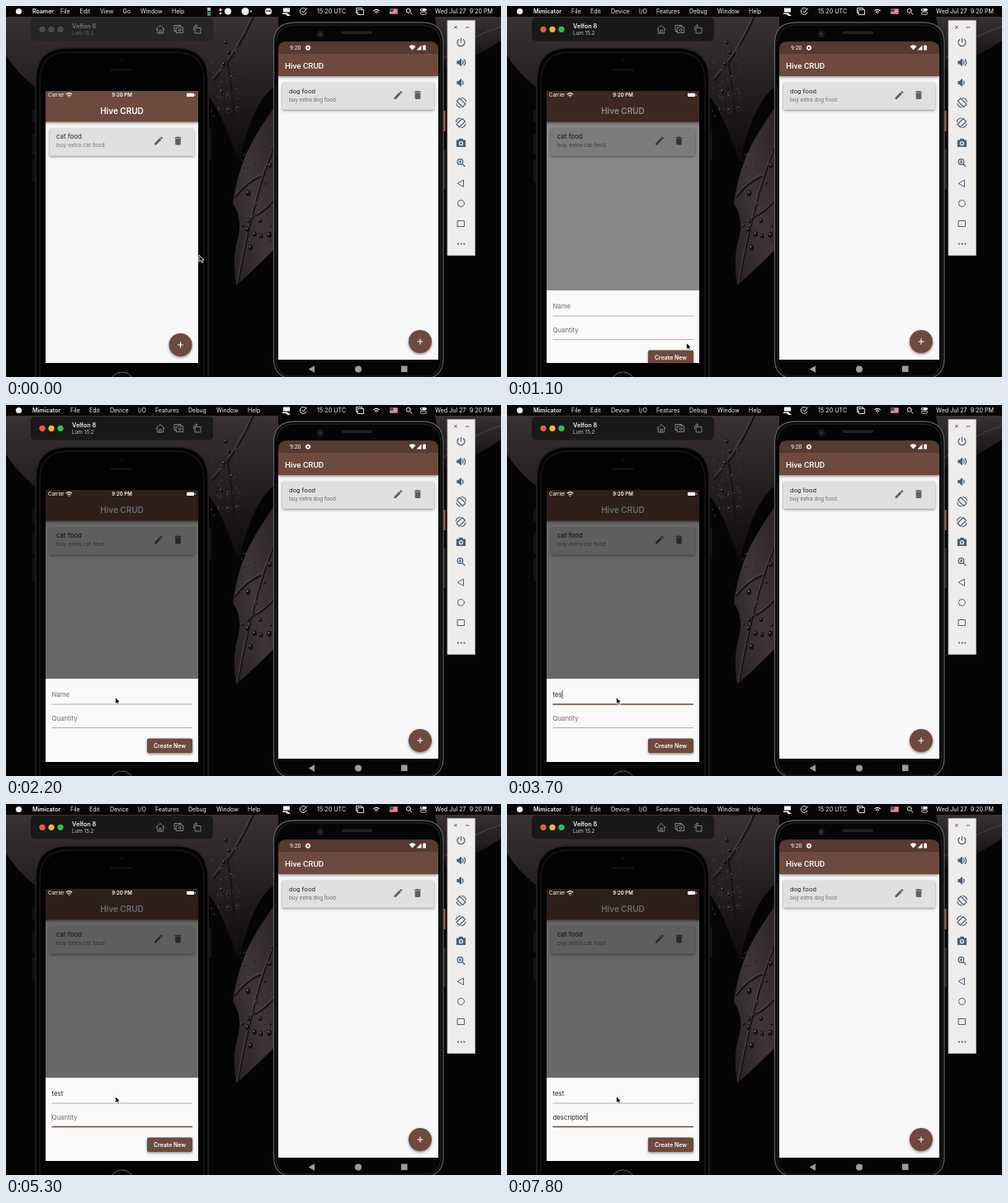
An HTML page that plays this animation: 600x450 px, repeating every 8 s.

```html
<!DOCTYPE html>
<html lang="en">
<head>
<meta charset="utf-8">
<title>Hive CRUD</title>
<style>
html, body { margin: 0; width: 100%; height: 100%; overflow: hidden; background: #060506; }
svg { display: block; width: 600px; height: 450px; font-family: Inter, sans-serif; }
text { white-space: pre; }
.roboto { font-family: Roboto, sans-serif; }
.bar { font-size: 7px; fill: #f2f2f2; }
.b { font-weight: 600; }
.mid { text-anchor: middle; }
.line { fill: none; stroke-linecap: round; stroke-linejoin: round; }
.field { font-size: 7.8px; }
</style>
</head>
<body>
<svg viewBox="0 0 600 450">
<defs>
  <path id="pencil" transform="scale(.55) translate(-12 -12)" d="M3 17.25V21h3.75L17.81 9.94l-3.75-3.75zM20.71 7.04c.39-.39.39-1.02 0-1.41l-2.34-2.34c-.39-.39-1.02-.39-1.41 0l-1.83 1.83 3.75 3.75z"/>
  <path id="bin" transform="scale(.55) translate(-12 -12)" d="M6 19c0 1.1.9 2 2 2h8c1.1 0 2-.9 2-2V7H6zM19 4h-3.5l-1-1h-5l-1 1H5v2h14z"/>
  <path id="wifi" d="M-4-1.6A5.6 5.6 0 0 1 4-1.6L0 3Z"/>
  <g id="waves" class="line" stroke="#fff" stroke-width="1.1"><path d="M-3.2-.8A4.5 4.5 0 0 1 3.2-.8M-1.6 1A2.3 2.3 0 0 1 1.6 1M0 2.6V2.6"/></g>
  <g id="fab">
    <circle r="14" fill="#6e483d" filter="url(#lift)"/>
    <path d="M-3.4 0H3.4M0-3.4V3.4" stroke="#fff" stroke-width="1.1"/>
  </g>
  <filter id="lift" x="-30%" y="-30%" width="160%" height="170%"><feDropShadow dx="0" dy="1.4" stdDeviation="1.5" flood-opacity=".45"/></filter>
  <linearGradient id="leaf" x1="1" y1="0" x2="0" y2="1">
    <stop offset="0" stop-color="#292223"/><stop offset=".55" stop-color="#3e3537"/><stop offset="1" stop-color="#251e1f"/>
  </linearGradient>
  <linearGradient id="fade" x1="0" y1="0" x2="0" y2="1">
    <stop offset="0" stop-color="#393234"/><stop offset="1" stop-color="#0d0a0b"/>
  </linearGradient>
  <clipPath id="screen"><path d="M48 103H233V433H48Z"/></clipPath>
</defs>

<!-- wallpaper -->
<path fill="#060506" d="M0 0H600V450H0Z"/>
<path fill="url(#fade)" d="M0 12H330V95Q300 110 282 190Q262 130 246 110L35 98Q14 82 0 60Z"/>
<path fill="url(#fade)" d="M520 12H600V42Q570 62 530 78Z"/>
<path fill="url(#leaf)" d="M332 112C308 150 284 175 275 240Q288 258 280 286Q274 308 279 339Q305 316 332 288Z"/>
<path class="line" stroke="#171213" stroke-width="2" d="M331 160Q306 205 281 337M309 207Q292 214 278 232M296 258Q316 250 331 228M300 13Q278 62 252 90M268 66Q275 100 279 174"/>
<path class="line" stroke="#5e5456" stroke-width=".7" d="M331 157Q304 204 280 336M309 204Q292 211 277 230M297 256Q316 247 331 225M298 13Q276 60 250 88M600 25Q565 35 530 64"/>
<g id="drops"></g>

<!-- menu bar -->
<path fill="#080607" d="M0 0H600V13H0Z"/>
<circle cx="15.5" cy="6.5" r="3.6" fill="#f2f2f2"/>
<g class="bar">
  <g id="menu"></g>
  <g id="extras">
    <path d="M244 2h4v4h-4Z" fill="#b7bcc0"/><path d="M244 7h4v5h-4Z" fill="#56808a"/>
    <circle cx="260" cy="4.5" r="1.5"/><circle cx="260" cy="9" r="1.3"/>
    <circle cx="269" cy="6.5" r="4"/><circle cx="290" cy="6.5" r="4.5"/><circle cx="297" cy="6.5" r="1"/>
    <circle cx="318" cy="6.5" r="4"/><path d="M315 6h6" stroke="#080607"/>
  </g>
  <path d="M336 2.5h8v5h-8ZM335 8.5h6l4 3.5h-4l-2-2h-4Z"/>
  <path class="line" stroke="#eee" d="M363.5 4A4 4 0 1 0 364 8M358.5 6l2 2 4-5"/>
  <text x="377" y="9" font-size="7.2">15:20 UTC</text>
  <path class="line" stroke="#eee" stroke-width=".9" d="M426.5 8.5h-2v-6h7v2M426.5 4.5h7v6h-7Z"/>
  <use href="#waves" x="449" y="6.5"/>
  <path fill="#eee" d="M465 3.5h9.5v6H465Z"/><path stroke="#c83d46" stroke-width=".9" d="M465 4h9.5M465 5.7h9.5M465 7.4h9.5M465 9.1h9.5"/><path fill="#33487e" d="M465 3.5h4.5v3.3H465Z"/>
  <path class="line" stroke="#eee" d="M490 8l2 2M490.3 5.7a2.5 2.5 0 1 1-5 0a2.5 2.5 0 1 1 5 0"/>
  <rect x="502" y="3" width="8" height="3.2" rx="1.6"/><rect x="502.4" y="7.3" width="7.2" height="2.8" rx="1.4" fill="none" stroke="#eee" stroke-width=".8"/><circle cx="504" cy="4.6" r="1" fill="#222"/>
  <text x="520" y="9" font-size="7.15">Wed Jul 27  9:20 PM</text>
</g>

<!-- window title bar -->
<rect id="titleBar" x="30" y="14" width="221" height="28.5" rx="5"/>
<g id="lights"><circle cx="44" cy="28.3" r="3.6"/><circle cx="55" cy="28.3" r="3.6"/><circle cx="66" cy="28.3" r="3.6"/></g>
<g id="device"><text class="b" x="80" y="27.3" font-size="7.3">Velfon 8</text><text x="80" y="35.3" font-size="6.3" opacity=".8">Lum 15.2</text></g>
<g class="line" stroke="#8b8b8b" stroke-width=".9">
  <path d="M181.8 28.5L187 23.5l5.2 5M183.3 27.5v5.5h7.4v-5.5M185.8 33v-3.5h2.4V33"/>
  <path d="M206 30.5h-2v-7h8v1.5M206.5 26h1.8l.8-1.2h3l.8 1.2h1.8v6.5h-8.2Z"/><circle cx="210.6" cy="29" r="1.5"/>
  <path d="M229.5 26.5h6.5v6.5h-6.5ZM227.5 29v-2.5q0-2.5 2.5-2.5h1.5M230 22.5l1.7 1.5-1.7 1.5"/>
</g>

<!-- left phone -->
<path class="line" stroke="#191919" stroke-width="2" d="M33.5 127v13M33.5 156v24M33.5 187v26M247.5 150v36"/>
<path d="M36 451V90Q36 51 74 51H207Q245 51 245 90V451Z" fill="#020202" stroke="#232323" stroke-width="1.6"/>
<path d="M41 451V91Q41 56 76 56H205Q240 56 240 91V451" fill="none" stroke="#121212" stroke-width="2"/>
<rect x="126" y="76" width="28" height="3" rx="1.5" fill="#111"/><circle cx="140.5" cy="66" r="2" fill="#0e0e0e"/>
<circle cx="140.5" cy="459" r="15" fill="#050505" stroke="#686868"/>
<g clip-path="url(#screen)">
  <path fill="#f8f8f8" d="M48 103H233V433H48Z"/>
  <path fill="#6e483d" filter="url(#lift)" d="M44 100H237V140.5H44Z"/>
  <text class="b mid" x="140.5" y="130.7" font-size="10" fill="#fff">Hive CRUD</text>
  <rect x="53" y="148" width="175" height="33.5" rx="1.5" fill="#e0e0e0" filter="url(#lift)"/>
  <text x="61" y="161" font-size="7.9" fill="#262626">cat food</text>
  <text x="61" y="171" font-size="6.8" fill="#757575">buy extra cat food</text>
  <g fill="#606060"><use href="#pencil" x="185" y="163.5"/><use href="#bin" x="208.5" y="163.5"/></g>
  <use href="#fab" x="211.5" y="411"/>
  <path id="scrim" d="M48 103H233V433H48Z"/>
  <g fill="#fff" font-size="6">
    <text x="51" y="110">Carrier</text><use href="#waves" x="76.5" y="107.8"/>
    <text class="b mid" x="140.5" y="110">9:20 PM</text>
    <rect x="219" y="105.7" width="9" height="4.3" rx="1"/><path d="M228.7 107h.9v1.7h-.9Z"/>
  </g>
  <g id="sheet">
    <path fill="#f9f9f9" d="M48 332H233V433H48Z"/>
    <g id="fields"></g>
    <path id="caret" stroke="#5a3a31" stroke-width=".9" d="M0 0v10"/>
    <rect x="171" y="404.5" width="55" height="17.5" rx="2" fill="#6e483d" filter="url(#lift)"/>
    <text class="b mid" x="198.5" y="415.9" font-size="6.9" fill="#fff">Create New</text>
  </g>
</g>

<!-- right phone -->
<path d="M531.5 127v25" stroke="#b85c4d" stroke-width="2"/><path d="M531.5 174v48" stroke="#333" stroke-width="2"/>
<path d="M324.5 428V46Q324.5 20 350 20H504Q530 20 530 46V428Q530 446 515 451H340Q324.5 446 324.5 428Z" fill="#050505" stroke="#5b5b5d" stroke-width="1.3"/>
<path d="M327.5 428V47Q327.5 23 351 23H503Q527 23 527 47V428Q527 444 514 449H341Q327.5 444 327.5 428Z" fill="none" stroke="#1d1d1e" stroke-width="1.5"/>
<circle cx="381" cy="34" r="4.5" fill="#151719"/><circle cx="381" cy="34" r="1.8" fill="#303942"/>
<rect x="407" y="30.5" width="37" height="3.5" rx="1.7" fill="#232323"/>
<path fill="#f8f8f8" d="M330 80H524V429H330Z"/>
<path fill="#6e483d" filter="url(#lift)" d="M330 57H524V85H330Z"/>
<path fill="#050505" d="M326 43H330V95H326ZM524 43H526V95H524Z"/>
<path fill="#573930" d="M330 58V53Q330 43 340 43H514Q524 43 524 53V58Z"/>
<g class="roboto" fill="#fff">
  <text x="344" y="53.2" font-size="7">9:20</text>
  <circle cx="366" cy="50.7" r="2" fill="none" stroke="#fff" stroke-width="1.5"/><circle cx="366" cy="50.7" r="2.9" fill="none" stroke="#fff" stroke-width=".8" stroke-dasharray="1.2 1.078"/>
  <use href="#wifi" x="492.5" y="50.5"/><path d="M497.5 53.5h6v-6ZM505.3 48h1v-.8h1.6v.8h1v5.6h-3.6Z"/>
  <text x="338" y="75.5" font-size="9.8" font-weight="500">Hive CRUD</text>
</g>
<rect x="335" y="92.5" width="184" height="33" rx="1.5" fill="#e0e0e0" filter="url(#lift)"/>
<g class="roboto"><text x="343" y="106" font-size="8" fill="#262626">dog food</text><text x="343" y="116" font-size="6.85" fill="#757575">buy extra dog food</text></g>
<g fill="#606060"><use href="#pencil" x="475.5" y="108"/><use href="#bin" x="499" y="108"/></g>
<use href="#fab" x="502" y="407"/>
<g fill="#9b9b9b"><path d="M366.5 440.5l7.5-4.3v8.6ZM479 436.5h7.5v7.5H479Z"/><circle cx="427" cy="440.5" r="4"/></g>

<!-- tool strip -->
<path d="M535 17.5H568.5V302.5H535Z" fill="#eeedec" stroke="#b5b3b3" stroke-width=".8"/>
<g class="line" stroke="#4b6076" stroke-width="1.2">
  <path stroke-width="1" d="M543.5 24.3l3 3m0-3l-3 3M557.5 26h3.5"/>
  <path d="M548.7 40.7a4.5 4.5 0 1 0 5.6 0M551.5 39v5"/>
  <g id="speaker"><path fill="#4b6076" d="M547 67h2l2.5-2.5v8L549 70h-2Z"/><path d="M553.3 66.3q1.8 2.2 0 4.4"/></g>
  <path d="M555.2 64.8q3 3.7 0 7.4"/><use href="#speaker" y="24.5"/>
  <g id="turn"><path d="M546.5 115.5l3.5-3.5 7 7-3.5 3.5ZM552.5 111.5q4.5.5 5 4.5M546 118.5q.5 4 5 4.5"/></g>
  <use href="#turn" transform="matrix(-1 0 0 1 1103 24.5)"/>
  <path fill="#4b6076" d="M546.5 163h2.5l1-1.7h3l1 1.7h2.5v7.5h-10Z"/><circle cx="551.5" cy="166.7" r="2" stroke="#eee"/>
  <circle cx="550.5" cy="189" r="3.3"/><path d="M553 191.5l3 3M549 189h3M550.5 187.5v3"/>
  <path stroke-width="1" d="M547.5 215l7-4v8ZM547.5 260.5h8v7h-8Z"/><circle cx="551.5" cy="239.5" r="4" stroke-width="1"/>
  <path stroke-width="2.2" d="M548 288.5h0M551.7 288.5h0M555.4 288.5h0"/>
</g>

<path id="pointer" d="M0 0V8.2L2 6.5 3.4 9.5 4.8 8.9 3.5 6H6Z" fill="#050505" stroke="#fff" stroke-width=".8"/>
</svg>

<script>
const $ = id => document.getElementById(id);
const clamp = v => Math.min(1, Math.max(0, v));
const LOOP = 8000, STEP = 100;

// water drops on the leaf
let seed = 7;
const rnd = () => (seed = seed * 16807 % 2147483647) / 2147483647;
let drops = '';
for (let i = 0; i < 90; i++) {
  const upper = i < 40;
  const x = upper ? 249 + rnd() * 36 : 284 + rnd() * 40;
  const y = upper ? 44 + rnd() * 90 : 170 + rnd() * 125;
  const r = .6 + 2.8 * rnd() ** 3;
  drops += `<ellipse cx="${x}" cy="${y}" rx="${r}" ry="${r * 1.25}" fill="#171213" stroke="#51484a" stroke-width=".5"/>
    <circle cx="${x - r * .3}" cy="${y - r * .4}" r="${r * .25}" fill="#a89da0"/>`;
}
$('drops').innerHTML = drops;

const menus = [
  [['Roamer', 32], ['File', 66], ['Edit', 89.5], ['View', 114], ['Go', 141.5], ['Window', 163], ['Help', 201]],
  [['Mimicator', 32], ['File', 78], ['Edit', 101], ['Device', 126], ['I/O', 160], ['Features', 181], ['Debug', 221], ['Window', 255], ['Help', 293]]
].map(list => list.map(([s, x], i) => `<text x="${x}" y="9" class="${i ? '' : 'b'}">${s}</text>`).join(''));

const fields = [
  { hint: 'Name', word: 'test', y: 354, from: 2500, to: 4600, keys: [3000, 3300, 3700, 4000] },
  { hint: 'Quantity', word: 'description', y: 382.5, from: 4600, to: LOOP,
    keys: [5600, 5900, 6200, 6400, 6600, 6800, 7000, 7200, 7300, 7600, 7800] }
];
$('fields').innerHTML = fields.map(f =>
  `<text class="field" x="55.5" y="${f.y}"></text><path d="M55.5 ${f.y + 9}H226"/>`).join('');
fields.forEach((f, i) => {
  f.text = $('fields').children[2 * i];
  f.rule = $('fields').children[2 * i + 1];
});

function drawFields(t) {
  $('caret').style.display = 'none';
  for (const f of fields) {
    const typed = f.word.slice(0, f.keys.filter(k => k <= t).length);
    const focused = t >= f.from && t < f.to;
    f.text.textContent = typed || f.hint;
    f.text.setAttribute('fill', typed ? '#262626' : '#6f6f6f');
    f.rule.setAttribute('stroke', focused ? '#6b463c' : '#8f8f8f');
    f.rule.setAttribute('stroke-width', focused ? 1.3 : .7);
    if (!focused) continue;
    const x = 55.6 + (typed ? f.text.getComputedTextLength() + .3 : 0);
    $('caret').style.display = '';
    $('caret').setAttribute('transform', `translate(${x} ${f.y - 7.8})`);
    $('caret').setAttribute('opacity', t >= 5200 && t < 5500 ? .5 : 1);
  }
}

const path = [[200, 234, 302], [500, 217.5, 408.5], [1200, 217.5, 408.5], [1700, 132.5, 354.5], [LOOP, 132.5, 354.5]];
function pointerAt(t) {
  const i = path.findIndex(p => p[0] > t);
  if (i < 1) return path[0].slice(1);
  const [a, b] = [path[i - 1], path[i]];
  const k = clamp((t - a[0]) / (b[0] - a[0])), e = k * k * (3 - 2 * k);
  return [a[1] + (b[1] - a[1]) * e, a[2] + (b[2] - a[2]) * e];
}

let active = -1;
function setActive(on) {
  if (on === active) return;
  active = on;
  $('menu').innerHTML = menus[on];
  $('extras').style.display = on ? 'none' : '';
  $('titleBar').setAttribute('fill', on ? '#191919' : '#262525');
  $('device').setAttribute('fill', on ? '#f0f0f0' : '#777');
  const colors = on ? ['#f2564d', '#f3b62f', '#35bf45'] : ['#4e4d4d', '#4e4d4d', '#4e4d4d'];
  colors.forEach((c, i) => $('lights').children[i].setAttribute('fill', c));
}

function frame(now) {
  const t = Math.floor(now % LOOP / STEP) * STEP;
  const open = clamp((t - 1000) / 250);
  setActive(t >= 900 ? 1 : 0);
  $('sheet').setAttribute('transform', `translate(0 ${101 * (1 - open) ** 4})`);
  $('scrim').setAttribute('opacity', .58 * (1 - (1 - open) ** 3));
  $('pointer').setAttribute('transform', `translate(${pointerAt(t)})`);
  drawFields(t);
  requestAnimationFrame(frame);
}
frame(performance.now());
</script>
</body>
</html>
```
